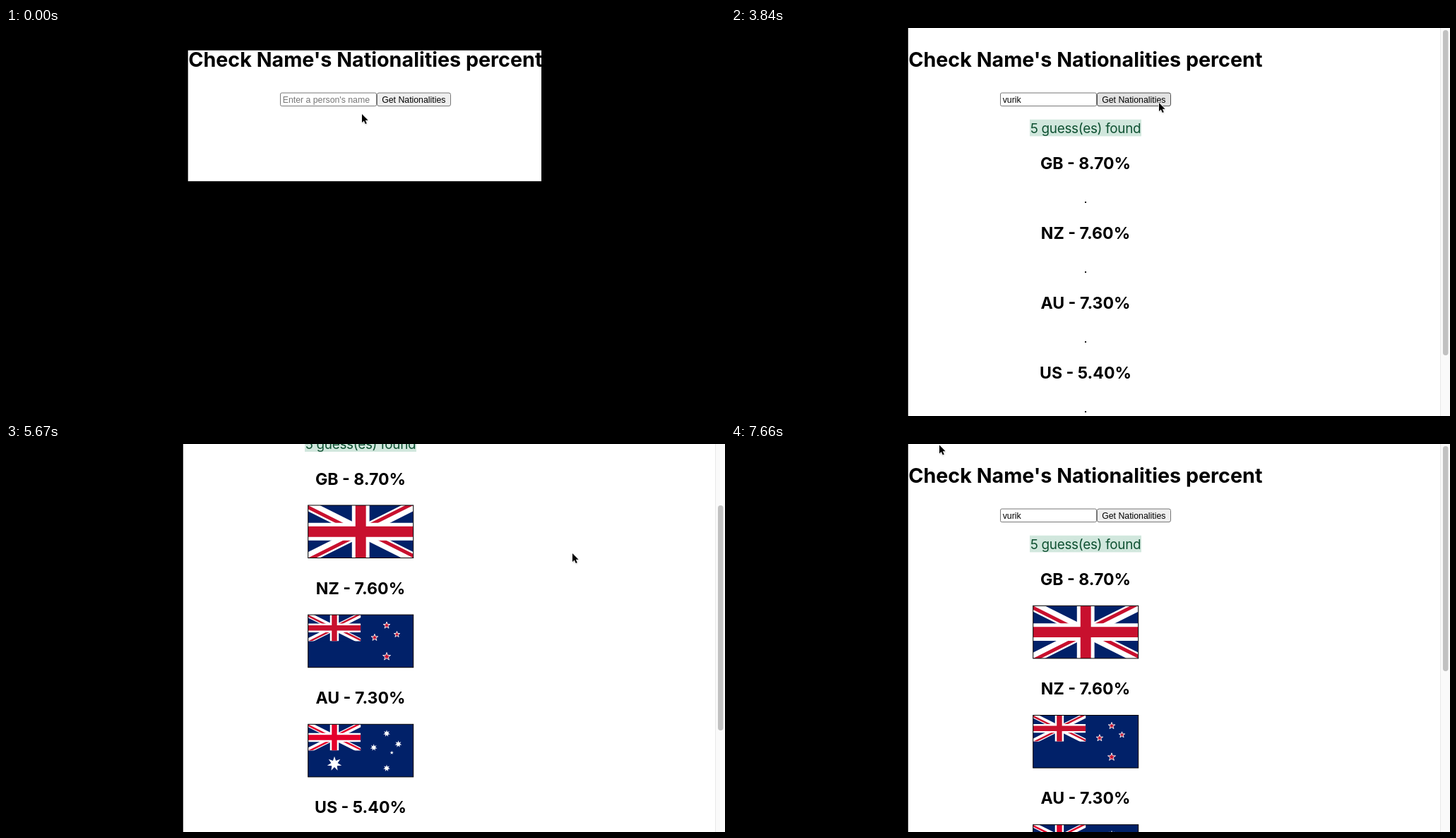
An HTML page for the animation above (7.74 s loop, 1018 by 550 pixels).

```html
<!DOCTYPE html>
<html lang="en">
<head>
<meta charset="utf-8">
<title>Nationalities</title>
<style>
  html, body { margin: 0; width: 100%; height: 100%; overflow: hidden; background: #000; }
  svg { display: block; }
  text { font-family: Inter, "Open Sans", sans-serif; font-optical-sizing: none; white-space: pre; }
  .mid { text-anchor: middle; }
  .title { font-size: 28.7px; font-weight: 700; }
  .entry { font-size: 23.1px; font-weight: 700; }
  .count { font-size: 18.9px; letter-spacing: -.3px; fill: #0f5132; }
  .form { font-family: "Liberation Sans", Arial, sans-serif; font-size: 12.3px; }
</style>
</head>
<body>
<svg id="stage" width="1018" height="550" viewBox="0 0 1018 550"></svg>
<script>
const LOOP = 7740;
const NAME = 'vurik';
const RESULTS = 3840, FLAGS = 3920;
const NAVY = '#012169', RED = '#c8102e';
const FLAG_W = 149, FLAG_H = 74.6;

// [time, letters typed]
const typing = [[0, 0], [740, 1], [1070, 2], [1230, 3], [1310, 4], [1470, 5]];

// [time, scroll offset]
const scrolling = [
  [0, 0], [5430, 4], [5510, 30], [5590, 82], [5670, 142.4], [5740, 205], [5820, 250],
  [6060, 238], [6140, 170], [6220, 75], [6300, 11], [6380, 0]
];

// Pointer moves: start, end, steps, bend, target
const START = [504, 122];
const moves = [
  [30, 330, 5, [480, 116], [455, 101]],
  [2000, 2290, 5, [560, 106], [620, 119]],
  [2360, 2510, 3, [614, 112], [606, 106]],
  [4330, 4630, 5, [720, 60], [841, 39]],
  [4870, 5100, 4, [812, 90], [802, 155]],
  [6540, 6690, 3, [825, 60], [858, 2]],
  [7260, 7660, 6, [570, 42], [295, 1.5]]
];

const rect = (x, y, w, h, attrs) => `<rect x="${x}" y="${y}" width="${w}" height="${h}" ${attrs}/>`;
const text = (x, y, cls, str, attrs = '') => `<text x="${x}" y="${y}" class="${cls}" ${attrs}>${str}</text>`;

function star(cx, cy, r, points, inner, attrs) {
  const d = Array.from({ length: points * 2 }, (_, i) => {
    const a = i * Math.PI / points, q = i % 2 ? r * inner : r;
    return `${(cx + q * Math.sin(a)).toFixed(2)} ${(cy - q * Math.cos(a)).toFixed(2)}`;
  });
  return `<path d="M${d.join('L')}Z" ${attrs}/>`;
}

// Union flag in a 60 by 30 grid
function union(w, h, red) {
  const diagonals = 'M0 0L60 30M60 0L0 30', cross = 'M30 0V30M0 15H60';
  const line = (d, color, width, more = '') =>
    `<path d="${d}" stroke="${color}" stroke-width="${width}" ${more}/>`;
  return `<g transform="scale(${w / 60} ${h / 30})" clip-path="url(#field)">` +
    rect(0, 0, 60, 30, `fill="${NAVY}"`) +
    line(diagonals, '#fff', 6) +
    line(diagonals, red, 4, 'clip-path="url(#quarters)"') +
    line(cross, '#fff', 10) + line(cross, red, 6) + '</g>';
}

const ensign = red => rect(0, 0, FLAG_W, FLAG_H, `fill="${NAVY}"`) + union(FLAG_W / 2, FLAG_H / 2, red);

function newZealand() {
  const stars = [[111.3, 15, 5], [94.2, 32.3, 5], [125.8, 27.8, 4.4], [111.3, 59.2, 5.8]];
  return ensign(RED) + stars.map(([x, y, r]) =>
    star(x, y, r, 5, .4, `fill="${RED}" stroke="#fff" stroke-width=".9"`)).join('');
}

function australia() {
  const stars = [[37.3, 56, 10.5], [111.3, 13, 5], [93, 33, 5], [127.8, 28, 5], [111.3, 62.2, 5]];
  return ensign('#e4002b') +
    stars.map(([x, y, r]) => star(x, y, r, 7, .45, 'fill="#fff"')).join('') +
    star(118.5, 40.3, 2.8, 5, .4, 'fill="#fff"');
}

function america(h) {
  const s = h / 13, cw = FLAG_W * .4, ch = s * 7;
  let out = '';
  for (let i = 0; i < 13; i++) out += rect(0, i * s, FLAG_W, s, `fill="${i % 2 ? '#fff' : '#b22234'}"`);
  out += rect(0, 0, cw, ch, 'fill="#3c3b6e"');
  for (let row = 1; row < 10; row++)
    for (let col = 1; col < 12; col++)
      if ((row + col) % 2 === 0) out += star(col * cw / 12, row * ch / 10, 2.3, 5, .4, 'fill="#fff"');
  return out;
}

const entries = [
  ['GB - 8.70%', FLAG_H, union(FLAG_W, FLAG_H, RED)],
  ['NZ - 7.60%', FLAG_H, newZealand()],
  ['AU - 7.30%', FLAG_H, australia()],
  ['US - 5.40%', 78, america(78)]
];

const flagList = entries.map(([label, h, art], i) =>
  text(502, 200 + i * 155.2, 'mid entry', label) +
  `<g transform="translate(427.7 ${229.3 + i * 155.2})">${art}` +
  rect(0, 0, FLAG_W, h, 'stroke="#000"') + '</g>').join('');

const plainList = entries.map(([label], i) =>
  text(502, 200 + i * 99, 'mid entry', label) +
  rect(501, 246 + i * 99, 2, 2, 'fill="#000"')).join('');

document.getElementById('stage').innerHTML = `
<defs>
  <clipPath id="field">${rect(0, 0, 60, 30, '')}</clipPath>
  <clipPath id="quarters"><path d="M30 15H60V30ZV30H0ZH0V0ZV0H60Z"/></clipPath>
  <filter id="soft" x="-50%" y="-50%" width="200%" height="200%"><feGaussianBlur stdDeviation="1.1"/></filter>
</defs>
${rect(0, 0, 1018, 550, 'fill="#000"')}
${rect(257.7, 31.7, 500.3, 185.5, 'id="panel" fill="#fff"')}
${rect(250.8, 0, 767.2, 550, 'id="page" fill="#fff"')}
<g id="content" fill="none">
  <g id="top">
    ${text(508.8, 54.5, 'mid title', "Check Name's Nationalities percent", 'fill="#000"')}
    ${rect(388.5, 92, 136, 18.6, 'id="input" rx="2" fill="#fff"')}
    ${text(391.7, 105.8, 'form', '', 'id="value"')}
    ${rect(391.5, 94.5, 1, 14, 'id="caret" fill="#000"')}
    ${rect(525.5, 92, 104, 18.6, 'id="button" rx="2.5"')}
    ${text(577.3, 105.8, 'mid form', 'Get Nationalities', 'fill="#000"')}
  </g>
  <g id="results" fill="#000">
    ${rect(423, 129.7, 158, 23.7, 'fill="#d1e7dd"')}
    ${text(502, 149.4, 'mid count', '5 guess(es) found')}
    <g id="plain">${plainList}</g>
    <g id="flags">${flagList.replace(/stroke="#000"/g, 'fill="none" stroke="#000"')}</g>
  </g>
</g>
<g id="bar">
  ${rect(1004, 0, 14, 550, 'fill="#fafafa"')}
  ${rect(1004, 0, 1, 550, 'fill="#e8e8e8"')}
  ${rect(1008, 3, 7.5, 461, 'id="thumb" rx="3.75" fill="#c1c1c1"')}
</g>
<g id="pointer">
  <g id="arrow">
    <path d="M0 1V13L3 10.5L5 15L7 14L5 9.7H9Z" fill="#000" opacity=".4" filter="url(#soft)"/>
    <path d="M0 0V12L2.8 9.5L4.8 14L6.8 13.2L4.8 8.8H8.6Z" fill="#000" stroke="#fff" stroke-width="1.6" paint-order="stroke"/>
  </g>
  <path id="beam" d="M-3 -7Q0 -7 0 -5.5V5.5Q0 7 -3 7M3 -7Q0 -7 0 -5.5M0 5.5Q0 7 3 7" fill="none" stroke="#000"/>
</g>`;

const el = {};
document.querySelectorAll('[id]').forEach(node => el[node.id] = node);

const show = (node, on) => node.style.display = on ? '' : 'none';
const setAll = (node, attrs) => Object.entries(attrs).forEach(([k, v]) => node.setAttribute(k, v));
const latest = (steps, t) => steps.reduce((v, [at, next]) => t >= at ? next : v, steps[0][1]);

function pointerAt(t) {
  let from = START;
  for (const [t0, t1, n, bend, to] of moves) {
    if (t < t0) break;
    if (t < t1) {
      const k = Math.floor((t - t0) * (n - 1) / (t1 - t0) + 1e-6) + 1;
      const u = k / n, e = u * u * (3 - 2 * u), r = 1 - e;
      return from.map((v, i) => r * r * v + 2 * r * e * bend[i] + e * e * to[i]);
    }
    from = to;
  }
  return from;
}

const textWidth = () => el.value.getComputedTextLength();

function draw(t) {
  const found = t >= RESULTS, loaded = t >= FLAGS;
  const shift = found ? -7 : 0;
  const scroll = latest(scrolling, t);
  const [x, y] = pointerAt(t);
  const px = x - shift, py = y + scroll;
  const inRow = py > 91.5 && py < 111;
  const overInput = inRow && px > 388 && px < 525;
  const overButton = inRow && px >= 525 && px < 630;
  const focused = t >= 330 && t < 2440;

  show(el.panel, !found);
  show(el.page, found);
  show(el.bar, found);
  show(el.results, found);
  show(el.plain, !loaded);
  show(el.flags, loaded);
  setAll(el.top, { transform: `translate(${shift} 0)` });
  setAll(el.content, { transform: `translate(0 ${-scroll})` });
  setAll(el.thumb, { y: 3 + scroll * .59, height: loaded ? 319 : 461 });

  const typed = NAME.slice(0, latest(typing, t));
  const value = typed || "Enter a person's name";
  if (el.value.textContent !== value) el.value.textContent = value;
  setAll(el.value, { fill: typed ? '#000' : '#757575' });
  setAll(el.input, { stroke: focused ? '#0a66d8' : '#767676', 'stroke-width': focused ? 2 : 1 });
  show(el.caret, focused && t < 2000);
  setAll(el.caret, { x: 391.5 + (typed ? textWidth() : 0) });
  setAll(el.button, { fill: overButton ? '#e3e3e3' : '#efefef', stroke: overButton ? '#4f4f4f' : '#767676' });

  show(el.pointer, t < 740 || t >= 2000);
  show(el.arrow, !overInput);
  show(el.beam, overInput);
  setAll(el.pointer, { transform: `translate(${x} ${y})` });
}

function tick() {
  draw(performance.now() % LOOP);
  requestAnimationFrame(tick);
}
tick();
</script>
</body>
</html>
```
